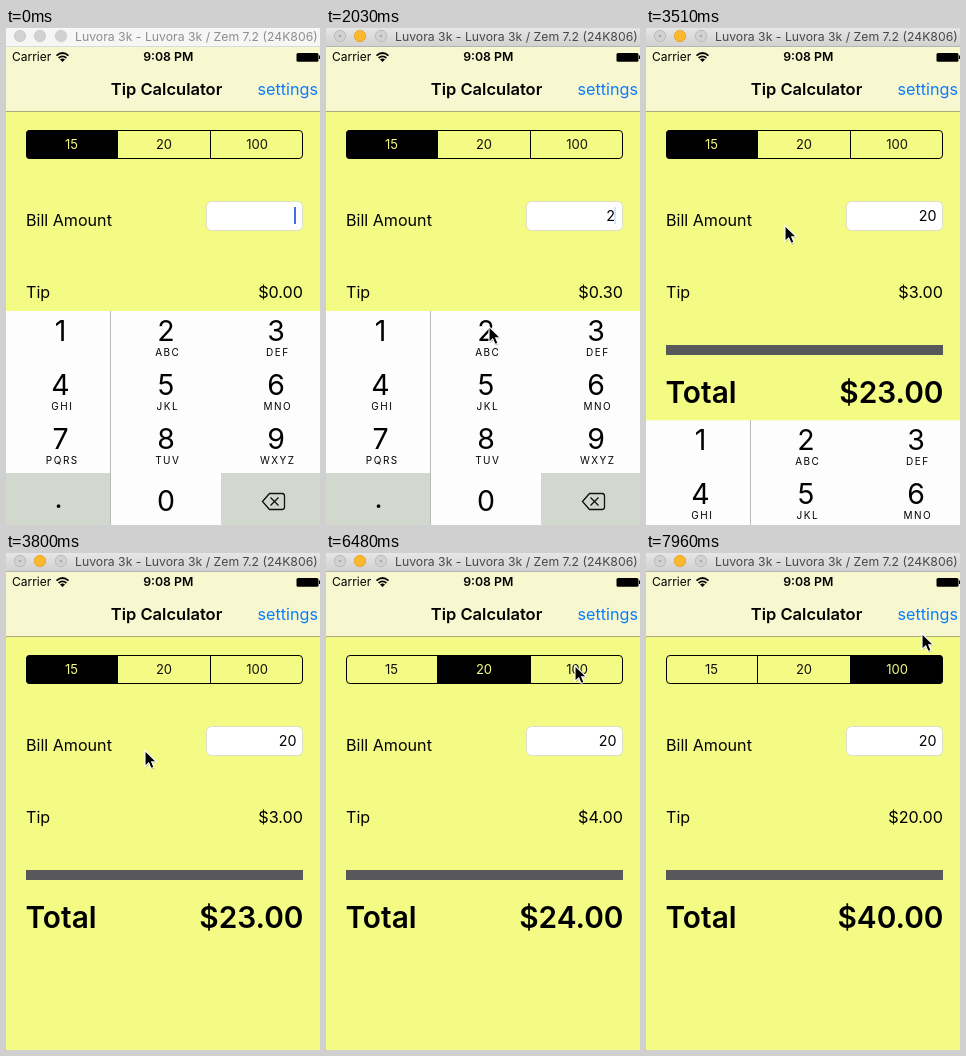
Recreate the animation shown at these times as an HTML page. Size 314 px wide and 497 px high, loop 8000 ms.

```html
<!DOCTYPE html>
<html lang="en">
<head>
<meta charset="utf-8">
<title>Tip Calculator</title>
<style>
  html, body { margin: 0; height: 100%; overflow: hidden; background: #f3fb85; }
  svg { display: block; width: 100vw; height: 100vh; font-family: Inter, "Liberation Sans", sans-serif; }
</style>
</head>
<body>
<svg id="stage" viewBox="0 0 314 497"></svg>
<script>
const LOOP = 8000, YELLOW = '#f3fb85';
const stage = document.getElementById('stage');

// Screen updates come in bursts: [first, last, count]
const bursts = [
  [450, 1470, 8], [1590, 2620, 8], [2760, 3800, 8], [4100, 5130, 8],
  [5280, 5280, 1], [6030, 6920, 7], [7670, 7960, 3]
];

// Pointer stops: [time, x, y]
const stops = [
  [590, 232, 422], [1330, 163, 298], [1890, 163, 298], [2470, 155, 470],
  [2780, 155, 470], [3210, 139, 197], [4050, 139, 197], [4540, 61, 117],
  [4980, 147, 119], [5950, 147, 119], [6470, 249, 112], [7600, 249, 112],
  [7815, 280, 89], [7955, 276, 80]
];

const clamp = v => Math.min(1, Math.max(0, v));
const smooth = v => v * v * (3 - 2 * v);

function stepTime(t) {
  let held = 0;
  for (const [first, last, count] of bursts) {
    if (t < first) break;
    const gap = (last - first) / (count - 1 || 1);
    held = first + gap * Math.min(count - 1, gap ? Math.floor((t - first) / gap + 1e-6) : 0);
  }
  return held;
}

function pointerAt(t) {
  const next = stops.findIndex(s => s[0] > t);
  if (next === 0) return null;
  if (next < 0) return stops[stops.length - 1].slice(1);
  const [t0, x0, y0] = stops[next - 1], [t1, x1, y1] = stops[next];
  const k = smooth((t - t0) / (t1 - t0));
  return [x0 + (x1 - x0) * k, y0 + (y1 - y0) * k];
}

const text = (str, x, y, size, extra = '') =>
  `<text x="${x}" y="${y}" font-size="${size}" ${extra}>${str}</text>`;
const rect = (x, y, w, h, fill, extra = '') =>
  `<rect x="${x}" y="${y}" width="${w}" height="${h}" fill="${fill}" ${extra}/>`;
const MID = 'text-anchor="middle"', END = 'text-anchor="end"', SEMI = ' font-weight="600"';

function windowBar(active) {
  const lights = [14, 34, 55].map((x, i) => {
    const amber = active && i === 1;
    return `<circle cx="${x}" cy="8" r="5.7" fill="${amber ? '#fdb92c' : '#d2d2d2'}"
      stroke="${amber ? '#dfa023' : active ? '#b4b4b4' : '#c8c8c8'}" stroke-width=".8"/>` +
      (active && !amber ? `<circle cx="${x}" cy="8" r="1.3" fill="#aaa"/>` : '');
  }).join('');
  return rect(0, 0, 314, 19, active ? 'url(#bar)' : '#f6f6f6') +
    rect(0, 18, 314, 1, active ? '#b5b5b5' : '#dadada') + lights +
    text('Luvora 3k - Luvora 3k / Zem 7.2 (24K806)', 69, 13, 12.25, `fill="${active ? '#484848' : '#8e8e8e'}"`);
}

const header = rect(0, 19, 314, 64, '#f8f8d0') + rect(0, 83, 314, 1, '#a9ab78') +
  text('Carrier', 6, 33, 12) +
  `<g fill="none" stroke="#000" stroke-width="1.7">
    <path d="M50.5 27.6Q56.5 22.4 62.5 27.6M52.6 30Q56.5 26.7 60.4 30"/></g>
  <path d="M54 31.4Q56.5 29.6 59 31.4L56.5 34Z"/>` +
  text('9:08 PM', 162.3, 33, 12.3, MID + SEMI) +
  rect(290.5, 25, 22, 8.7, '#000', 'rx="1.5"') + rect(313, 27.5, 1, 3.5, '#000') +
  text('Tip Calculator', 160.5, 67, 16.5, MID + SEMI) +
  text('settings', 312, 67, 16.2, END + ' fill="#0a7cff"');

function segments(selected, pressed) {
  const cells = ['15', '20', '100'].map((label, i) => {
    const x = [20, 111.5, 204.5][i], w = [91.5, 93, 92.5][i];
    const fill = i === selected ? '#000' : i === pressed ? '#cdd274' : 'none';
    return rect(x, 102, w, 29, fill) +
      text(label, [65.5, 158, 251][i], 121, 13, `${MID} fill="${i === selected ? YELLOW : '#111'}"`);
  }).join('');
  return `<g clip-path="url(#pill)">${cells}</g>` +
    rect(20.5, 102.5, 276, 28, 'none', 'rx="3.5" stroke="#000"') +
    '<path d="M111.5 102v29M204.5 102v29" stroke="#000"/>';
}

const keypad = rect(0, 283, 314, 214, '#fdfdfd') +
  rect(0, 445, 104, 52, '#d3d8cf') + rect(215, 445, 99, 52, '#d3d8cf') +
  rect(104, 283, 1, 214, '#b9bbb6') +
  ['', 'ABC', 'DEF', 'GHI', 'JKL', 'MNO', 'PQRS', 'TUV', 'WXYZ'].map((letters, i) => {
    const x = [54.5, 160, 270][i % 3], y = 313 + 54 * Math.floor(i / 3);
    return text(i + 1, x, y, 28.5, MID) +
      text(letters, x + 1.8, y + 15, 10, MID + ' letter-spacing="1.5"');
  }).join('') +
  text('.', 52.5, 480, 28, MID) + text('0', 160, 483, 28.5, MID) +
  `<path d="M256.5 473.5L263.5 465.5H276Q278.5 465.5 278.5 468V479Q278.5 481.5 276 481.5H263.5Z
    M264.5 469.5l8 8m0-8l-8 8" fill="none" stroke="#111" stroke-width="1.3"/>`;

const defs = `<defs>
  <linearGradient id="bar" x2="0" y2="1"><stop stop-color="#e6e6e6"/><stop offset="1" stop-color="#d0d0d0"/></linearGradient>
  <clipPath id="pill"><rect x="20" y="102" width="277" height="29" rx="4"/></clipPath></defs>`;

const arrow = 'd="M0 .5V16.3L3.7 13 6.1 18.4 9 17.2 6.7 11.9H11.5Z"';

function draw(t) {
  const bill = t < 1740 ? '' : t < 2600 ? '2' : '20';
  const percent = t < 4960 ? 15 : t < 6600 ? 20 : 100;
  const selected = t < 5280 ? 0 : t < 6770 ? 1 : 2;
  const pressed = t >= 4960 && t < 5280 ? 1 : t >= 6600 && t < 6770 ? 2 : -1;
  const tip = bill * percent / 100;
  const money = v => '$' + v.toFixed(2);

  const editing = t < 3350;
  const blink = t - (t >= 2600 ? 2620 : 0);
  const caret = editing ? clamp(.5 + Math.cos(blink / 820 * 2 * Math.PI)) : 0;
  const slide = 214 * smooth(clamp((t - 3300) / 400));

  const pos = pointerAt(t);
  const ring = (t > 1460 && t < 1580) || (t > 2460 && t < 2600);
  const pointer = pos ? `<g transform="translate(${pos})">
    ${ring ? '<circle cx="3" cy="2" r="10.3" fill="none" stroke="#222"/>' : ''}
    <path ${arrow} transform="translate(.6 1.2)" opacity=".25"/>
    <path ${arrow} stroke="#fff" stroke-width="1.1"/></g>` : '';

  stage.innerHTML = defs + rect(0, 0, 314, 497, YELLOW) + header + windowBar(t >= 1590) +
    segments(selected, pressed) +
    text('Bill Amount', 20, 198, 16.1) +
    rect(200.5, 173.5, 96, 29, '#fff', 'rx="5" stroke="#dcdfc8"') +
    text(bill, editing ? 289 : 290.5, 193, 14.3, END) +
    rect(288, 179, 2, 17, '#426bf2', `opacity="${caret}"`) +
    text('Tip', 20, 270, 16.1) + text(money(tip), 297, 270, 16.2, END) +
    rect(20, 317, 277, 10, '#58585a') +
    text('Total', 19.5, 375, 29.8, SEMI) +
    text(money(+bill + tip), 297.5, 375, 29.8, END + SEMI) +
    (slide < 214 ? `<g transform="translate(0 ${slide})">${keypad}</g>` : '') + pointer;
}

let shown = -1;
function tick() {
  const t = stepTime(performance.now() % LOOP);
  if (t !== shown) draw(shown = t);
  requestAnimationFrame(tick);
}
tick();
</script>
</body>
</html>
```
